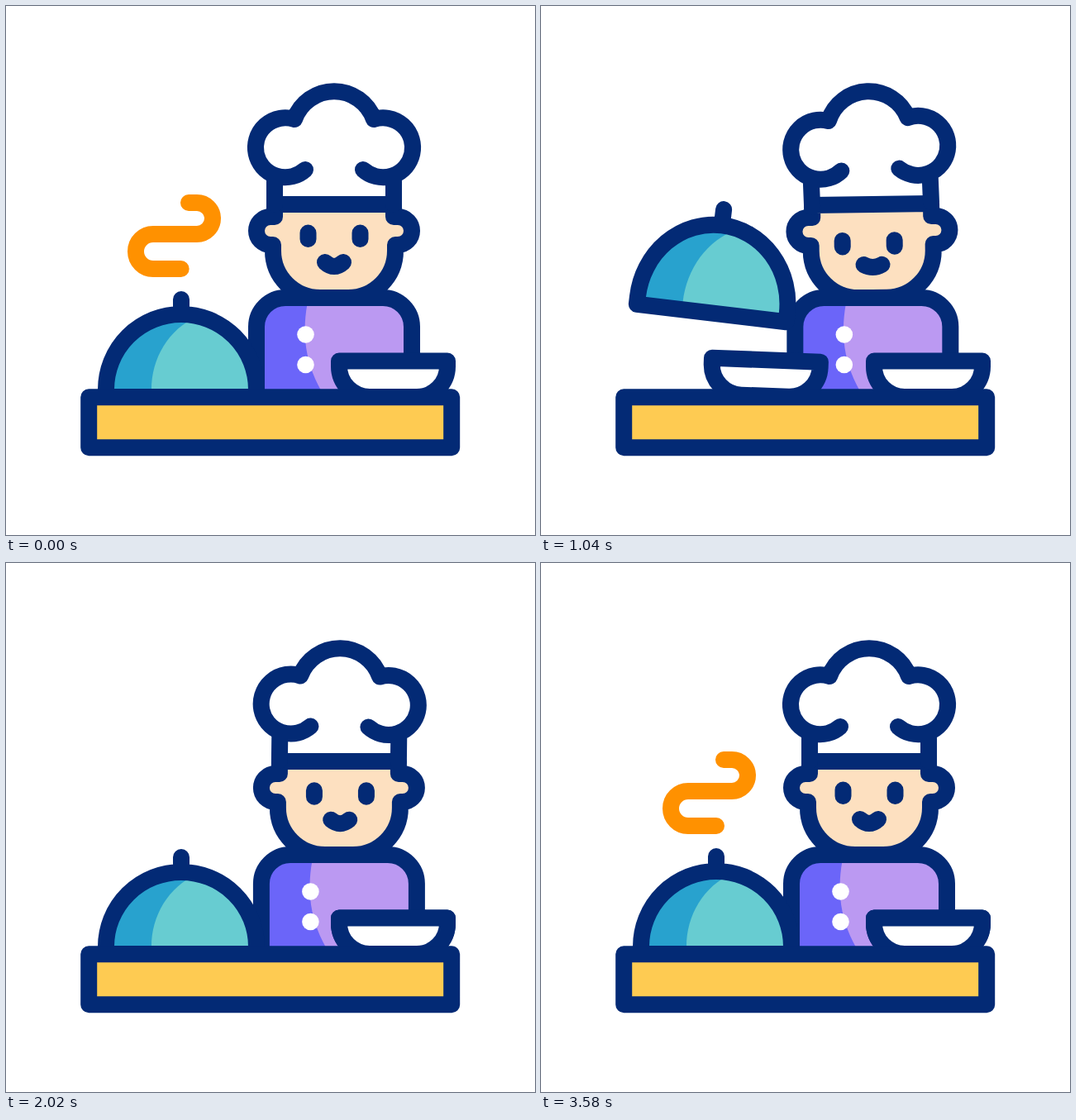
An HTML page for the animation above (3.6 s loop, 640 by 640 pixels).

```html
<!DOCTYPE html>
<html lang="en">
<head>
<meta charset="utf-8">
<title>Chef at the counter</title>
<style>
  html, body { margin: 0; width: 100%; height: 100%; overflow: hidden; background: #fff; }
  svg { display: block; }
  .line { fill: none; stroke: #032a75; stroke-width: 20; stroke-linecap: round; stroke-linejoin: round; }
  .dome .line, #mouth { vector-effect: non-scaling-stroke; }
</style>
</head>
<body>
<svg width="640" height="640" viewBox="0 0 640 640">
  <defs>
    <path id="bowlShape" class="line" style="fill:#fff"
      d="M403 429.5H534V436a37 37 0 0 1-37 37H440a37 37 0 0 1-37-37z"/>
  </defs>

  <path id="steam" class="line" style="stroke:#ff9100" pathLength="1" stroke-dasharray="1 2"
    d="M212 318H178a21 21 0 0 1 0-42H231a19 19 0 0 0 0-38H221"/>

  <g id="chef">
    <g id="head">
      <path class="line" style="fill:#fde0c0"
        d="M325 240V255H320a17 17 0 0 0 0 34h3V296a57 57 0 0 0 57 57H414a57 57 0 0 0 57-57V289h3a17 17 0 0 0 0-34h-5V240z"/>
      <path id="eyes" class="line" d="M365.5 274.5v7.5M428.5 274.5v7.5"/>
      <path id="mouth" class="line" d="M-11-2.5Q0 7.5 11-2.5"/>
      <path id="hat" class="line"
        d="M325 205V240M469 205V240M362 198A36 36 0 1 1 349 137A51 51 0 0 1 445 137A36 36 0 1 1 432 198"/>
    </g>
    <path fill="#bb99f2" d="M303 473V388a35 35 0 0 1 35-35H456a35 35 0 0 1 35 35V473z"/>
    <path fill="#6b65f9" d="M303 473V388a35 35 0 0 1 35-35H366C357 394 361 434 386 473z"/>
    <path class="line" d="M303 473V388a35 35 0 0 1 35-35H456a35 35 0 0 1 35 35V473"/>
    <circle cx="362.5" cy="397.5" r="10.3" fill="#fff"/>
    <circle cx="362.5" cy="434" r="10.3" fill="#fff"/>
  </g>

  <use href="#bowlShape"/>
  <use id="bowl" href="#bowlShape"/>

  <g id="dome" class="dome">
    <path fill="#28a2ce" d="M-91 0V-9a91 91 0 0 1 182 0V0z"/>
    <path fill="#67ccd1" d="M-36 0V-9C-36-46-16-82 20-97.8A91 91 0 0 1 91-9V0z"/>
    <path class="line" d="M-91 0V-9a91 91 0 0 1 182 0V0zM0-118V-104"/>
  </g>

  <rect class="line" style="fill:#fecb52" x="100.2" y="473.2" width="439" height="61"/>
</svg>

<script>
const LOOP = 3600;
const el = id => document.getElementById(id);
const clamp = x => Math.min(1, Math.max(0, x));
const move = (id, transform) => el(id).setAttribute("transform", transform);

function draw(t) {
  const ramp = (from, to) => clamp((t - from) / (to - from));
  const ease = (from, to) => ramp(from, to) ** 2 * (3 - 2 * ramp(from, to));
  // Rises from a to b, holds, and falls from c to d.
  const pulse = (a, b, c, d) => ease(a, b) - ease(c, d);

  // Steam leaves and returns along the same path, from its lower end.
  const gone = ramp(0, 700), back = ramp(2960, 3580);
  const steam = el("steam");
  steam.style.strokeDashoffset = back > 0 ? 1 - back : -gone;
  steam.style.visibility = gone < 1 || back > 0 ? "visible" : "hidden";

  // The chef peers at the dome, then leans after the bowl; the hat trails behind.
  const shift = 2.5 * ease(0, 400) + 30.3 * ease(960, 1500) - 31.8 * ease(1600, 2160) - ease(2260, 2640);
  const peer = pulse(400, 760, 900, 1320);
  const tilt = 6.3 * pulse(900, 1320, 1320, 1800) - 3.2 * peer;
  const hatTilt = 3.2 * pulse(1320, 1700, 1700, 2160) - 3.2 * peer;
  const eyesX = 7 * pulse(1100, 1700, 1700, 2160) - 6 * pulse(0, 760, 900, 1320);
  const eyesY = 9 * pulse(0, 760, 1400, 2160);
  const mouthX = 6 * pulse(960, 1400, 1700, 2160);
  const calm = pulse(0, 400, 1700, 2160);
  move("chef", `translate(${shift})`);
  move("head", `rotate(${tilt} 397 345)`);
  move("hat", `rotate(${hatTilt - tilt} 397 240)`);
  move("eyes", `translate(${eyesX} ${eyesY})`);
  move("mouth", `translate(${397 + mouthX} ${312.5 + 2 * calm}) scale(1 ${1 - 0.4 * calm})`);

  // The bowl draws back a little before it slides across.
  const bowlX = 269 * ease(820, 1470) - 12.5 * ease(520, 760) - 256.5;
  const bowlTilt = 11 * pulse(860, 1320, 1320, 1500) - 2.5 * pulse(520, 760, 860, 1320);
  move("bowl", `translate(${bowlX} ${-0.6 * Math.abs(bowlTilt)}) rotate(${bowlTilt} 468.5 451)`);

  // The dome squashes, lifts and sways, and squashes again on landing.
  const lift = pulse(460, 740, 1340, 1640);
  const sway = pulse(760, 1320, 1320, 1640);
  const squash = 0.11 * pulse(0, 400, 440, 740) + 0.09 * pulse(1580, 1700, 1700, 2100)
    + 0.05 * pulse(2980, 3280, 3280, 3580);
  const stretch = 1 + 0.09 * lift - 0.04 * sway - squash;
  move("dome", `translate(${212 - 1.5 * lift - 8.5 * sway} ${473 - 99 * lift - 5 * sway})
    rotate(${2.5 * lift + 8.5 * sway}) scale(1 ${stretch})`);
}

const start = performance.now();
function tick() {
  draw((performance.now() - start) % LOOP);
  requestAnimationFrame(tick);
}
tick();
</script>
</body>
</html>
```
